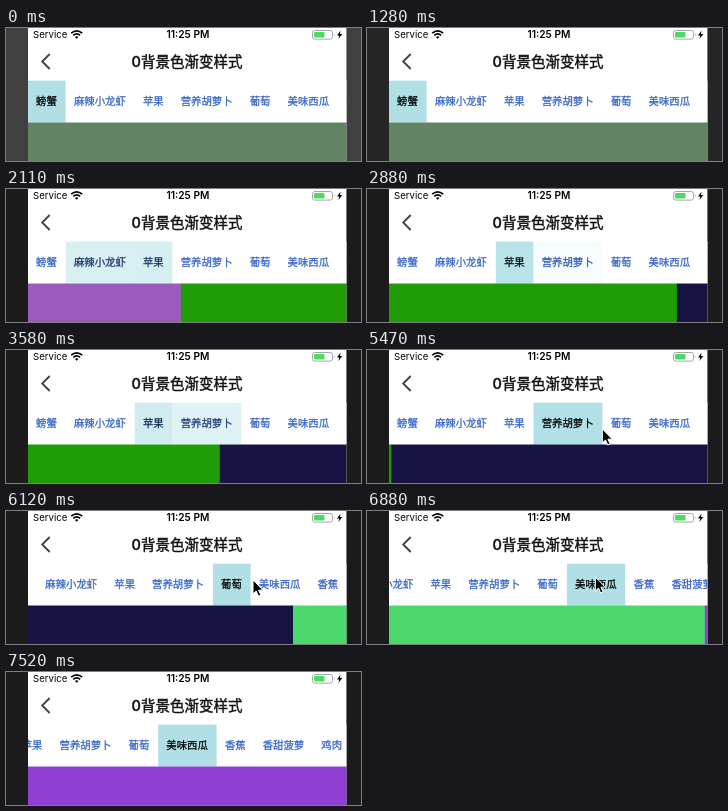
Write an HTML page that moves like this. It is 355 px wide and 133 px high and loops after 7880 ms.

```html
<!DOCTYPE html>
<html lang="zh">
<head>
<meta charset="utf-8">
<title>背景色渐变样式</title>
<style>
  html, body { margin: 0; width: 100%; height: 100%; overflow: hidden; background: #1b1b1b; }
  svg { display: block; width: 355px; height: 133px; }
  text { font-family: Inter, "Noto Sans CJK SC", "Noto Sans CJK", sans-serif; }
  .tab { font-size: 10.4px; font-weight: 500; stroke-width: 0.25px; }
  .title { font-size: 14.5px; font-weight: 500; fill: #111; stroke: #111; stroke-width: 0.4px; }
</style>
</head>
<body>
<svg viewBox="0 0 355 133">
  <defs><clipPath id="screen"><rect x="22" width="318.4" height="133"/></clipPath></defs>
  <rect id="desk" width="355" height="133"/>
  <g clip-path="url(#screen)">
    <rect x="22" width="319" height="133" fill="#fff"/>
    <g id="pages"></g>
    <g id="tabs"></g>
    <text x="27" y="10.3" font-size="9.6">Service</text>
    <g fill="none" stroke="#000" stroke-width="1.7">
      <path d="M65.2 5.2Q70.7 0.4 76.2 5.2"/>
      <path d="M67.3 7.4Q70.7 4.5 74.1 7.4"/>
    </g>
    <path d="M68.9 8.9Q70.7 7.4 72.5 8.9L70.7 10.8Z"/>
    <text x="181.9" y="10.4" font-size="10.2" font-weight="600" text-anchor="middle">11:25 PM</text>
    <rect x="306.5" y="2.5" width="20" height="8.6" rx="2.2" fill="none" stroke="#a6a6a6"/>
    <rect x="308" y="4" width="10.5" height="5.6" rx="1" fill="#4cd964"/>
    <path d="M328 5.3q1.6 1.5 0 3z" fill="#a6a6a6"/>
    <path d="M334.6 2.4L331 7.4H333.3L332.4 11L336.3 5.9H333.9Z"/>
    <path d="M43.7 26L36.2 33.5L43.7 41" fill="none" stroke="#444" stroke-width="1.9"/>
    <text class="title" x="181" y="39.2" text-anchor="middle">0背景色渐变样式</text>
    <path id="cursor" d="M0 0V14L3.2 11L5.4 16L7.8 15L5.6 10.2H10Z" stroke="#fff" stroke-width="1"/>
  </g>
</svg>
<script>
const LOOP = 7880, LEFT = 22, WIDTH = 319, CENTER = LEFT + WIDTH / 2;
const BAR_TOP = 52.6, PAGE_TOP = 94.3;
const CHAR = 10.4, PAD = 8.5;
const WHITE = [255, 255, 255], TINT = [176, 224, 230];
const BLUE = [50, 98, 200], BLACK = [0, 0, 0];
const TAP_FOUR = 6040, TAP_FIVE = 6863;

const colors = ['#638463', '#9c5bbc', '#1f9c06', '#171342', '#4bd96d', '#8f40d2'];
const labels = ['螃蟹', '麻辣小龙虾', '苹果', '营养胡萝卜', '葡萄', '美味西瓜', '香蕉', '香甜菠萝', '鸡肉'];

const linear = p => p;
const easeOut = p => 1 - (1 - p) ** 3;
const smooth = p => p * p * (3 - 2 * p);
const mix = (a, b, p) => a + (b - a) * p;
const mixColor = (a, b, p) => `rgb(${a.map((v, i) => Math.round(mix(v, b[i], p)))})`;

// Keys are [time, value, easing towards this key].
function track(keys, t) {
  let prev = keys[0];
  for (const key of keys) {
    if (t < key[0]) {
      if (key === prev) return key[1];
      const p = (t - prev[0]) / (key[0] - prev[0]);
      return mix(prev[1], key[1], (key[2] || linear)(p));
    }
    prev = key;
  }
  return prev[1];
}

function add(parent, name, attrs) {
  const node = document.createElementNS('http://www.w3.org/2000/svg', name);
  for (const key in attrs) node.setAttribute(key, attrs[key]);
  return parent.appendChild(node);
}

const $ = id => document.getElementById(id);
const desk = $('desk'), pageGroup = $('pages'), tabGroup = $('tabs'), cursor = $('cursor');

colors.forEach((fill, i) =>
  add(pageGroup, 'rect', { x: LEFT + i * WIDTH, y: PAGE_TOP, width: WIDTH + 0.5, height: 40, fill }));

let edge = LEFT;
const tabs = labels.map(label => {
  const width = label.length * CHAR + 2 * PAD;
  const box = add(tabGroup, 'rect', { x: edge, y: BAR_TOP, width, height: PAGE_TOP - BAR_TOP });
  const text = add(tabGroup, 'text', { x: edge + PAD - 0.4, y: 77.4, class: 'tab' });
  text.textContent = label;
  const center = edge + width / 2;
  edge += width;
  return { box, text, center };
});
const centered = i => Math.max(0, tabs[i].center - CENTER);

const pageKeys = [
  [1470, 0], [1820, 1, smooth], [2110, 1.52], [2160, 1.555], [2290, 1.555],
  [2700, 2, easeOut], [2825, 2], [2880, 2.097], [3630, 2.42], [3650, 2.42],
  [4160, 2, easeOut], [4830, 2], [5060, 2.18], [5180, 2.18], [5470, 2.993, easeOut],
  [5530, 3], [TAP_FOUR, 3], [6350, 4, smooth], [TAP_FIVE, 4], [7170, 5, smooth]
];
const stripKeys = [
  [5510, 0], [5830, centered(3), smooth], [TAP_FOUR, centered(3)],
  [6350, centered(4), smooth], [TAP_FIVE, centered(4)], [7170, centered(5), smooth]
];
const cursorX = [[5250, 222], [5470, 235.3], [5800, 247], [6540, 247], [6640, 228.3], [6930, 228.3], [7500, 205]];
const cursorY = [[5250, 136], [5470, 79], [5800, 69], [6540, 69], [6640, 66], [6930, 66], [7500, 136, smooth]];
const deskKeys = [[1120, 64], [1340, 27]];

function render(t) {
  const page = track(pageKeys, t);
  const active = t < TAP_FOUR ? page : t < TAP_FIVE ? 4 : 5;
  const shade = Math.round(track(deskKeys, t));
  desk.setAttribute('fill', `rgb(${shade},${shade},${shade})`);
  pageGroup.setAttribute('transform', `translate(${-page * WIDTH})`);
  tabGroup.setAttribute('transform', `translate(${-track(stripKeys, t)})`);
  tabs.forEach(({ box, text }, i) => {
    const level = Math.max(0, 1 - Math.abs(active - i));
    const ink = mixColor(BLUE, BLACK, level);
    box.setAttribute('fill', mixColor(WHITE, TINT, level));
    text.setAttribute('fill', ink);
    text.setAttribute('stroke', ink);
  });
  cursor.setAttribute('transform', `translate(${track(cursorX, t)} ${track(cursorY, t)})`);
}

const start = performance.now();
function tick() {
  render((performance.now() - start) % LOOP);
  requestAnimationFrame(tick);
}
tick();
</script>
</body>
</html>
```
